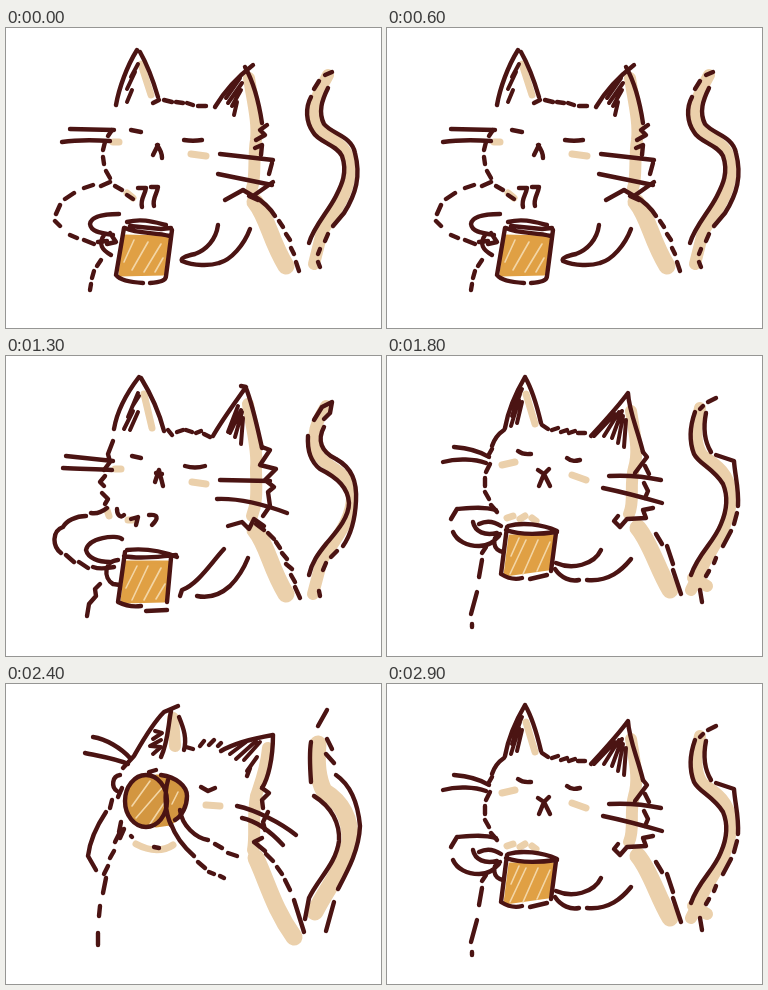
An HTML page that plays this animation: 375 px wide and 300 px high, repeating every 3 s.

```html
<!DOCTYPE html>
<html lang="en">
<head>
<meta charset="utf-8">
<title>Cat with a drink</title>
<style>
html, body { margin: 0; width: 100%; height: 100%; overflow: hidden; background: #fff; }
svg { display: block; width: 375px; height: 300px; }
path { fill: none; stroke-linecap: round; stroke-linejoin: round; }
.ink { stroke: #4b1413; stroke-width: 4.4; }
.hatch { stroke: #4b1413; stroke-width: 4; }
.shade { stroke: #ebd0ab; stroke-width: 12; }
.thin { stroke-width: 7; }
.wide { stroke-width: 17; }
.drink { fill: #e0a044; stroke: #e0a044; stroke-width: 3; }
.deep { fill: #d39640; stroke: #d39640; }
.glint { stroke: #f3d6a6; stroke-width: 1.6; }

/* scenes: sitting, cup raised, drinking */
.scene { animation: 3s step-end infinite; }
.sit { animation-name: sit; }
.lift { animation-name: lift; }
.gulp { animation-name: gulp; }
@keyframes sit { 0% { opacity: 1 } 60%, 100% { opacity: 0 } }
@keyframes lift { 0% { opacity: 0 } 60% { opacity: 1 } 63.333% { opacity: 0 } 96.666%, 100% { opacity: 1 } }
@keyframes gulp { 0% { opacity: 0 } 63.333% { opacity: 1 } 96.666%, 100% { opacity: 0 } }

/* three drawings per scene, 100 ms each */
.one, .two, .three { animation: .3s step-end infinite; }
.one { animation-name: one; }
.two { animation-name: two; }
.three { animation-name: three; }
@keyframes one { 0% { opacity: 1 } 33.333%, 100% { opacity: 0 } }
@keyframes two { 0% { opacity: 0 } 33.333% { opacity: 1 } 66.666%, 100% { opacity: 0 } }
@keyframes three { 0% { opacity: 0 } 66.666%, 100% { opacity: 1 } }
</style>
</head>
<body>
<svg viewBox="0 0 375 300">
<defs>
  <g id="calm">
    <path class="shade thin" d="M135 36L145 67M107 114H113M185 126L200 128M121 165L127 170"/>
    <path class="shade" d="M243 50C247 75 252 95 250 112C247 130 250 150 246 160"/>
    <path class="shade wide" d="M249 174C262 190 264 212 280 238"/>
    <path class="shade" d="M322 47C312 65 304 80 311 97C318 112 342 112 344 138C345 164 328 185 316 204L308 236"/>
    <path class="drink" d="M118 208L162 209L157 246L114 247Z"/>
    <path class="glint" d="M118 234L128 212M126 242L142 214M138 244L155 216M149 244L157 230"/>
    <path class="ink" d="M110 77C113 60 121 38 131 22M134 24C142 38 147 52 152 69"/>
    <path class="hatch" d="M121 74L126 62M121 61L129 44M125 49L132 36"/>
    <path class="ink" d="M147 75L153 72M158 72L166 74M170 74L177 75M181 75L187 77M192 78H200"/>
    <path class="ink" d="M209 79C218 64 230 50 247 37M239 39C248 55 253 75 256 95"/>
    <path class="hatch" d="M220 70L234 50M222 75L236 55M226 78L235 62M228 87L231 74"/>
    <path class="ink" d="M261 97L254 102L259 107L250 112M249 120L256 117L255 127M266 135L263 146M219 172L237 162L247 168L267 154M243 168L252 172"/>
    <path class="ink" d="M214 126L267 132M212 146L266 157M64 101L108 102M56 114C70 112 88 112 104 113"/>
    <path class="ink" d="M125 102L135 104M178 112C184 113 190 113 196 112M152 117L147 127M151 117C154 121 156 126 156 130"/>
    <path class="ink" d="M106 102L102 108M99 114L97 122M97 129L98 136M100 143L104 150"/>
    <path class="ink" d="M104 154L95 158M87 157L78 160M68 165L59 171M54 177L50 186M49 193L54 198M64 207L71 210M78 212L88 216M92 214L101 213"/>
    <path class="ink" d="M113 186C98 186 85 188 84 196C85 204 95 205 107 207M98 207C92 216 96 222 105 227M104 205L110 214L101 216"/>
    <path class="ink" d="M109 158L116 162M121 167L127 171M132 160H140C139 167 134 171 136 179M145 159H152C151 166 146 171 148 178"/>
    <path class="ink" d="M118 200L110 247C114 252 122 254 137 255M144 255C154 254 160 253 160 248L166 202M119 200C132 206 148 204 164 208M121 194C136 190 148 194 160 197M124 198L155 201L165 200"/>
    <path class="ink" d="M212 197C210 212 200 222 189 226C180 228 174 230 176 233C188 238 204 238 213 235C225 232 238 217 244 201"/>
    <path class="ink" d="M95 232L91 238M88 243L86 250M85 256L84 262M248 168C258 174 264 180 269 188M273 193L277 199M280 206L284 212M285 220L288 226M290 234L293 243"/>
    <path class="ink" d="M326 44L319 47M313 53L308 61M305 69C299 80 300 94 307 104C312 114 330 116 336 128C342 145 335 158 330 168C322 184 308 198 303 215"/>
    <path class="ink" d="M322 60C316 72 312 84 318 96C326 106 346 108 349 125C355 148 350 166 338 185L327 198M322 206L319 213M314 221L312 226M312 234L314 239"/>
  </g>

  <g id="shaggy">
    <path class="shade thin" d="M138 38L146 72M109 113H115M186 126L200 128M101 154L103 160M122 164H128"/>
    <path class="shade" d="M242 48C246 75 252 95 250 112C250 130 252 145 246 160"/>
    <path class="shade wide" d="M249 174C262 190 264 212 280 238"/>
    <path class="shade" d="M320 50C311 65 304 80 311 97C318 112 342 112 346 138C347 164 328 185 316 204L307 238"/>
    <path class="drink" d="M120 206L162 206L158 245L116 246Z"/>
    <path class="glint" d="M120 232L131 210M126 244L142 210M138 244L155 212M150 243L159 228"/>
    <path class="ink" d="M108 73C111 55 120 38 133 21M135 22C143 35 152 52 158 75"/>
    <path class="hatch" d="M118 73L127 55M122 61L132 37M124 74L132 56M126 51L133 40"/>
    <path class="ink" d="M162 74L166 79M171 76L177 74M180 74L186 76M190 77L195 75M198 78L204 81"/>
    <path class="ink" d="M207 80C216 64 228 48 240 31L235 30M240 32C247 50 251 70 256 92"/>
    <path class="hatch" d="M222 76L232 50M224 77L235 54M229 81L236 56M235 88L237 62"/>
    <path class="ink" d="M256 91L264 94L254 109L270 113L259 124L268 131L262 136L264 150L257 160M222 170L236 166L243 173L248 163L258 170"/>
    <path class="ink" d="M214 124L264 125M211 143C235 142 262 150 281 157M60 100L107 105M57 112C75 113 92 113 106 114"/>
    <path class="ink" d="M126 100L135 102M179 110C186 112 192 112 199 110M153 114L149 126M153 114L157 130M150 117L156 118"/>
    <path class="ink" d="M107 85L102 98L104 106L98 114M99 120L94 126L98 130M96 137L102 143L99 148"/>
    <path class="ink" d="M101 152C96 156 90 158 85 157M80 160C70 160 60 165 57 171C46 175 46 190 55 197M60 199L68 206M73 206L82 212M87 211C95 214 101 212 108 211"/>
    <path class="ink" d="M116 183C110 178 82 182 80 194C82 202 92 206 104 206M112 204C98 205 97 222 107 228L114 229"/>
    <path class="ink" d="M111 153C111 160 115 162 118 159M125 163L132 161L130 169M143 159C152 158 153 162 146 169"/>
    <path class="ink" d="M119 196L112 246C120 250 128 251 135 250M140 255L161 254M118 200C135 204 155 200 170 199M121 194C140 192 156 195 171 201M165 202L161 246"/>
    <path class="ink" d="M218 193C205 207 192 228 176 234L174 240M191 240C205 243 215 238 224 230C232 222 238 212 242 202"/>
    <path class="ink" d="M94 228L89 233L90 240L83 248L81 260M250 168L258 174M262 177L268 183M270 186L274 192M276 197L281 203M280 208L286 213M285 219L289 226M289 231L294 242"/>
    <path class="ink" d="M308 64L316 51L326 46L324 57L318 63M302 80C301 96 305 106 314 113C332 122 342 132 343 147C343 162 330 176 320 188C312 198 306 206 303 219"/>
    <path class="ink" d="M318 71C311 84 315 96 330 103C346 112 351 125 350 145C349 165 344 180 337 190M331 195L325 201M320 207L317 214M313 235L314 240"/>
  </g>

  <g id="raised">
    <path class="shade thin" d="M139 38L148 68M115 109L128 106M185 119L199 124M120 162L126 160M133 163L138 160M145 162L149 165"/>
    <path class="shade" d="M244 55C248 80 252 95 247 112C242 130 248 145 242 158"/>
    <path class="shade wide" d="M251 172C264 188 270 212 283 234"/>
    <path class="shade" d="M313 52C308 72 308 90 316 100C328 108 342 116 344 138C345 164 330 185 318 206L304 234M306 222L320 230"/>
    <path class="drink" d="M123 180L166 180L161 213L118 219Z"/>
    <path class="glint" d="M124 200L132 182M123 218L139 184M136 218L151 184M150 215L163 186"/>
    <path class="ink" d="M118 72C121 55 128 38 138 21C145 33 150 50 154 67"/>
    <path class="hatch" d="M124 70L132 44M126 52L135 33M130 67L135 46M125 60L133 38"/>
    <path class="ink" d="M155 69L161 73M165 74L171 72M174 76L180 74M182 77L188 75M191 77L198 77"/>
    <path class="ink" d="M204 80C215 68 230 52 241 37C242 55 250 72 256 96"/>
    <path class="hatch" d="M207 80L228 58M217 80L232 56M225 82L235 55M231 87L236 60M237 91L239 64"/>
    <path class="ink" d="M256 96L260 101L248 117M258 110L262 118M257 127L261 135L258 142M266 152L256 154L259 162L240 163L233 171L227 165L231 160"/>
    <path class="ink" d="M222 120C240 119 260 121 274 124M216 132C235 136 258 142 275 147M67 91C80 92 94 96 102 101M56 106C70 102 88 103 99 107"/>
    <path class="ink" d="M131 95C136 99 140 98 144 98M180 102C185 106 189 105 193 104M151 114L157 118L162 113M157 118L152 130M157 118L163 130"/>
    <path class="ink" d="M117 74C111 78 107 84 105 90M105 93L101 100M103 108L99 116M98 122V130M98 136L102 143M104 149L110 156"/>
    <path class="ink" d="M109 154C96 150 82 152 70 153L64 163M66 176C70 185 80 190 92 190C102 190 106 186 112 180M86 166C88 176 98 180 110 177M92 168C100 164 108 166 114 170M113 178C104 182 106 194 116 196"/>
    <path class="ink" d="M120 171L114 218C122 223 128 224 135 222M143 223L160 219M121 170C135 166 155 168 170 175M119 174C135 180 155 178 170 176M169 177L164 215"/>
    <path class="ink" d="M169 207C185 214 207 209 214 194M168 213C174 222 184 226 192 224M200 224C222 226 235 214 244 203"/>
    <path class="ink" d="M99 191L95 197M95 204L92 221M90 236L84 258M85 268V271M269 178L275 188M280 190L286 208M286 214L294 238"/>
    <path class="ink" d="M329 42L321 46M316 50L313 53M308 56C303 70 302 85 307 98C312 108 326 112 336 128C341 140 340 154 334 168C326 188 312 196 304 219"/>
    <path class="ink" d="M319 57C316 72 318 86 324 96M329 99L347 105C348 120 352 132 351 150M350 157L347 168M344 175L336 190M329 202L327 207M322 215L319 220M313 234L315 246"/>
  </g>

  <g id="tipped">
    <path class="shade" d="M167 34L169 62M262 64C260 85 254 100 250 112C246 135 250 150 247 166"/>
    <path class="shade thin" d="M200 121L214 122M130 160C145 168 158 167 167 161"/>
    <path class="shade wide" d="M250 174C262 200 268 225 288 253"/>
    <path class="shade wide" d="M312 60C310 80 312 95 318 107C336 118 345 135 344 158C338 185 322 202 309 228"/>
    <path class="drink deep" d="M150 92C168 92 178 98 181 110C181 124 174 134 164 140L150 142ZM119 117A21 25 0 0 1 161 117A21 25 0 0 1 119 117Z"/>
    <path class="glint" d="M126 122L144 97M130 134L156 104M144 140L158 119M166 120L172 108"/>
    <path class="ink" d="M87 53C100 55 115 64 124 74M79 69C92 72 108 74 122 80"/>
    <path class="ink" d="M117 84L128 72C136 58 146 40 158 28L172 22M165 27C162 42 162 58 155 73M173 33C178 45 181 55 178 66"/>
    <path class="hatch" d="M149 47L156 49L147 55M155 56L144 62L155 63L147 70"/>
    <path class="ink" d="M180 63L187 65M194 62L198 57M203 61L208 56M212 62L215 59"/>
    <path class="ink" d="M215 67C230 58 250 54 267 51C267 75 262 95 256 104"/>
    <path class="hatch" d="M224 70L240 58M230 75L250 57M238 76L254 58M241 87L251 73"/>
    <path class="ink" d="M195 103L202 107L209 104M148 163L153 164M125 152L126 153"/>
    <path class="ink" d="M244 84L241 92M256 104L263 109L256 116L257 124M262 128L257 138L259 146M256 154L248 158L259 167"/>
    <path class="ink" d="M231 122C250 126 275 139 290 151M236 134C250 137 265 148 277 161"/>
    <path class="ink" d="M119 117A21 26 0 0 1 161 117A21 26 0 0 1 119 117ZM143 88L150 86M155 91C170 93 181 102 181 112C181 122 176 132 169 136M162 96C158 110 159 128 165 141M114 91C106 92 105 103 111 107M112 113L116 104"/>
    <path class="ink" d="M106 116L104 124M100 128C92 140 84 155 82 172L90 186M98 190L102 182M104 174L108 167M109 158L113 150M115 138L113 148L118 145L114 154"/>
    <path class="ink" d="M174 126C176 142 190 154 202 156M209 160L216 164M222 169L231 172M165 140C170 154 179 164 188 172M192 178L199 184M203 188L208 190M214 192L218 194"/>
    <path class="ink" d="M100 194L97 209M94 222L93 232M92 249V261M260 170L267 177M271 183L276 190M279 196L284 206M288 216L298 248"/>
    <path class="ink" d="M321 26L312 42M305 58C303 70 304 84 305 98M308 112C326 123 334 140 333 157C330 180 312 195 303 214L299 235"/>
    <path class="ink" d="M321 55L326 65M320 70L328 79M330 91C346 102 352 120 354 142C353 166 342 186 332 205M328 218L320 247"/>
  </g>
</defs>

<g class="scene sit">
  <use class="one" href="#calm"/>
  <use class="two" href="#shaggy"/>
  <use class="three" href="#calm" transform="translate(0 -1)"/>
</g>
<g class="scene lift">
  <use href="#raised"/>
</g>
<g class="scene gulp">
  <use class="one" href="#tipped"/>
  <use class="two" href="#tipped" transform="translate(5 -5)"/>
  <use class="three" href="#tipped" transform="translate(2 -2)"/>
</g>
</svg>
</body>
</html>
```
